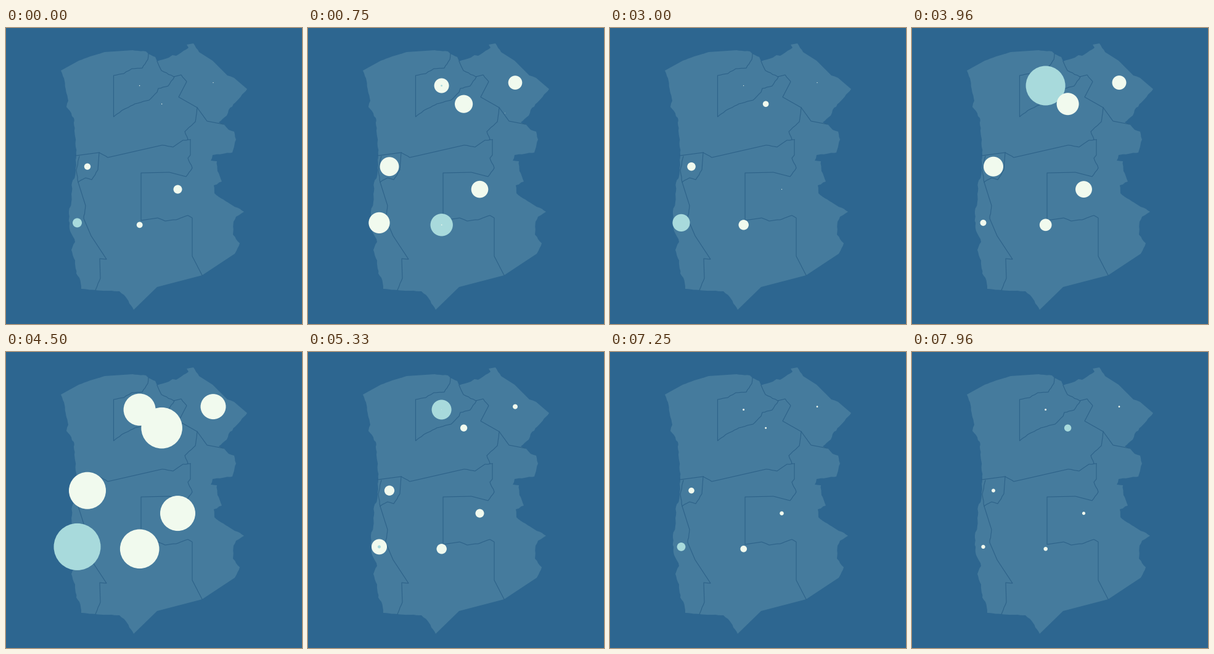
These frames come from a looping animation (480 px wide and 480 px high, 8000 ms). A matplotlib script:

```python
import numpy as np
import matplotlib.pyplot as plt
from matplotlib.animation import FuncAnimation
from matplotlib.patches import Circle, Polygon

SIZE, DPI = 480, 100
FRAMES, LOOP_MS = 192, 8000
BEAT, MOVE = 12, 7          # frames per beat, frames of movement at its end

SEA, LAND, BORDER = "#2d6690", "#457b9d", "#2d6289"
PALE, TEAL = "#f1faee", "#a8dadc"

# Coast, clockwise
north = [(89, 69), (118, 53), (140, 45), (160, 39), (205, 36), (227, 38),
         (231, 42), (242, 47), (245, 54), (264, 48), (270, 44), (276, 45),
         (296, 32), (293, 27), (304, 25), (313, 39), (335, 53), (359, 77),
         (370, 81), (391, 99)]
east = [(391, 99), (361, 133), (358, 142), (345, 153), (354, 157), (361, 165),
        (370, 168), (373, 181), (367, 202), (335, 206), (332, 215), (342, 216),
        (343, 232), (350, 249), (337, 255), (338, 268), (360, 283), (386, 298),
        (373, 306), (369, 314), (368, 335), (379, 349), (371, 366)]
south = [(371, 366), (318, 401), (245, 420), (207, 457), (194, 436),
         (184, 427), (145, 425), (122, 423)]
west = [(122, 423), (119, 405), (114, 398), (112, 377), (106, 360), (112, 347),
        (103, 325), (102, 297), (106, 282), (107, 251), (112, 240), (114, 206),
        (110, 146), (98, 128), (101, 118), (95, 86), (89, 69)]

# Inner borders
upper = [(231, 42), (230, 51), (221, 65), (204, 66), (191, 74), (174.5, 77),
         (174.5, 144), (191, 132), (209, 123), (232, 117), (245, 104),
         (247, 98), (263, 94), (273, 79)]
corner = [(245, 54), (252, 69), (272, 79), (284, 76), (293, 87), (280, 112),
          (310, 129), (326, 151), (352, 156)]
link = [(310, 129), (307, 152), (290, 168), (295, 181)]
middle = [(113, 207), (151, 202), (165, 210), (253, 190), (271, 193),
          (287, 182), (299, 181)]
inner = [(299, 181), (299, 206), (295, 211), (302, 227), (292, 241),
         (265, 234), (219, 235), (219, 312), (246, 308), (258, 313),
         (276, 311), (295, 304), (302, 308), (302, 370), (318, 401)]
shore = [(151, 202), (149, 230), (139, 246), (129, 243), (117, 250),
         (129, 288), (126, 309), (138, 337), (163, 375), (152, 374),
         (153, 406), (145, 425)]
spur = [(119, 208), (114, 230), (117, 250)]

NAMES = "ABCDEFGH"
CENTRES = [(216.6, 93.5), (252.6, 123.2), (336, 88.6), (132, 224.7),
           (115.5, 315.9), (278.5, 261.6), (216.7, 319.3), (319.5, 138)]
LEADERS = "EGAEEEEAAEAEEEEEB"   # teal place at each beat


def make_radii():
    """Radius of places A to H at every beat."""
    early = [[.7, .7, .6, 5.2, 7.5, 7, 4.9],
             [14, 16, 12.3, 17, 19, 16, 21.2],
             [9.5, 6, 5.3, 6, 6, .6, 6],
             [7, 4.3, .6, 7.1, 13.5, 7.9, 7],
             [1.5, 4.5, .6, 7, 12.9, 5, 7.5],
             [1.2, 4.6, .6, 6.9, 9, 7, 8],
             [.6, 4.8, .6, 6.8, 14.1, .6, 8.2]]
    late = [[8, 6, 5.3, 4, 5, 4, 7],
            [36, 20, 12.5, 18, 5, 15, 10.3],
            [26, 33.3, 20.5, 30, 38, 28.5, 31.8],
            [22.4, 7, 5.3, 9, 17.5, 8.2, 9],
            [1.2, 2.3, .6, 6, 8.6, 4, 6.2]]
    low = np.array([.6, .7, .3, 3.9, 5.3, 2.3, 4.2])
    swell = np.array([7, 6, 7.7, 10, 16.3, 9, 12])
    end = [.6, 6.65, .3, 1.8, 3.7, 1.5, 1.8]
    rows = np.array(early + late + [(low + late[-1]) / 2, swell * .95,
                                    low, swell, end])
    blip = np.zeros((len(rows), 1))
    blip[2] = 2.8
    return np.hstack([rows, blip])


def rough(points, amp, rng, step=4, longest=99):
    """Break a line into short, slightly shaken pieces; long runs stay straight."""
    out = []
    for a, b in zip(points, points[1:]):
        a, b = np.array(a, float), np.array(b, float)
        length = np.hypot(*(b - a))
        n = max(1, int(length / step)) if length < longest else 1
        out.append(a)
        out += [a + (b - a) * i / n + rng.uniform(-amp, amp, 2)
                for i in range(1, n)]
    return out + [np.array(points[-1], float)]


def draw_map(ax):
    rng = np.random.default_rng(4)
    coast = (rough(north, .4, rng, longest=25) + rough(east, .7, rng)
             + rough(south, .5, rng, longest=40) + rough(west, .9, rng))
    ax.add_patch(Polygon(coast, fc=LAND, ec="none"))
    for line in (upper, corner, link, middle, inner, shore, spur):
        path = rough(line, .5, rng, longest=24)
        ax.plot(*zip(*path), color=BORDER, lw=.8, solid_joinstyle="round")
    ax.plot([0, SIZE], [SIZE - .5] * 2, color="#2a5c83", lw=.72)


fig = plt.figure(figsize=(SIZE / DPI, SIZE / DPI), dpi=DPI, facecolor=SEA)
ax = fig.add_axes([0, 0, 1, 1])
ax.set_xlim(0, SIZE)
ax.set_ylim(SIZE, 0)
ax.axis("off")
draw_map(ax)

radii = make_radii()
dots = [[ax.add_patch(Circle(c, 0, lw=0, zorder=z)) for z in (3, 4)]
        for c in CENTRES]


def colour(name, beat):
    return TEAL if LEADERS[beat] == name else PALE


def show(dot, radius, fill):
    dot.set_radius(radius)
    dot.set_facecolor(fill)
    dot.set_visible(radius > 0)


def update(frame):
    beat, step = divmod(frame, BEAT)
    move = MOVE if beat else MOVE + 1
    p = max(0, step - (BEAT - move)) / move
    for name, (old, new), r0, r1 in zip(NAMES, dots, radii[beat],
                                        radii[beat + 1]):
        c0, c1 = colour(name, beat), colour(name, beat + 1)
        if c0 == c1:
            show(old, r0 + (r1 - r0) * p, c0)
            show(new, 0, c1)
        else:
            # a colour change: one dot shrinks while the next grows over it
            show(old, r0 * (1 - p), c0)
            show(new, r1 * p, c1)
    return [d for pair in dots for d in pair]


anim = FuncAnimation(fig, update, frames=FRAMES, interval=LOOP_MS / FRAMES,
                     init_func=lambda: update(0), repeat=True, repeat_delay=0)
plt.show()
```
